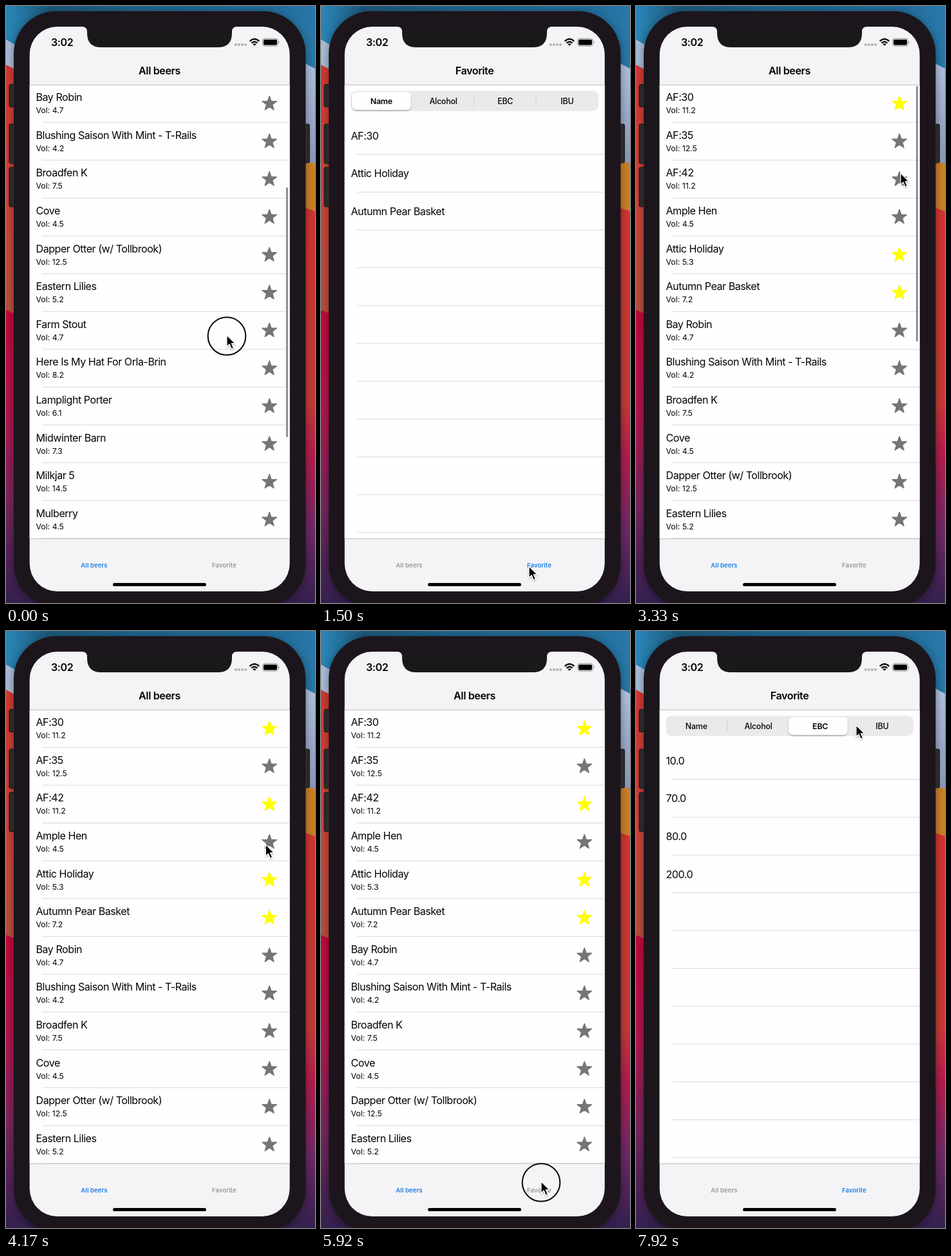
These frames come from a looping animation (480 px wide and 925 px high, 8 s). An HTML page:

```html
<!DOCTYPE html>
<html lang="en">
<head>
<meta charset="utf-8">
<title>Beer list</title>
<style>
html, body { margin: 0; width: 100%; height: 100%; overflow: hidden; background: #1a181a; }
svg { display: block; width: 480px; height: 925px; font-family: Inter, "Open Sans", sans-serif; }
text { fill: #050505; white-space: pre; }
.name { font-size: 16.1px; letter-spacing: -.48px; }
.vol { font-size: 12.3px; }
.title { font-size: 16.1px; font-weight: 600; letter-spacing: -.4px; text-anchor: middle; }
.clock { font-size: 16.1px; font-weight: 600; letter-spacing: -.4px; }
.seg { font-size: 12.4px; font-weight: 500; letter-spacing: -.2px; text-anchor: middle; }
.seg.on { font-weight: 600; }
.tab { font-size: 9.5px; font-weight: 600; letter-spacing: .1px; text-anchor: middle; fill: #98979a; }
.tab.on { fill: #187de8; }
.line { stroke: #d9d8db; stroke-width: 1; }
.star { fill: #757477; stroke: #757477; stroke-width: 1.4; stroke-linejoin: round; }
.star.on { fill: #ff0; stroke: #ff0; }
.btn { fill: #2b292b; stroke: #171517; }
</style>
</head>
<body>
<svg id="stage" viewBox="0 0 480 925">
  <defs>
    <linearGradient id="sky" x2="1" y2="0">
      <stop offset="0" stop-color="#2a86b8"/><stop offset=".14" stop-color="#1b5779"/>
      <stop offset=".5" stop-color="#1f658f"/><stop offset=".85" stop-color="#206a98"/><stop offset="1" stop-color="#2878a8"/>
    </linearGradient>
    <linearGradient id="red" x2="0" y2="1">
      <stop offset="0" stop-color="#d33a32"/><stop offset=".6" stop-color="#c9453a"/><stop offset="1" stop-color="#b5503f"/>
    </linearGradient>
    <linearGradient id="rose" x2="0" y2="1">
      <stop offset="0" stop-color="#c4083a"/><stop offset=".35" stop-color="#b3154f"/>
      <stop offset=".68" stop-color="#74265f"/><stop offset="1" stop-color="#33204f"/>
    </linearGradient>
    <linearGradient id="warm" x2="0" y2="1">
      <stop offset="0" stop-color="#d2342f"/><stop offset=".5" stop-color="#c63a36"/><stop offset=".63" stop-color="#b31c4c"/>
      <stop offset=".82" stop-color="#6e2868"/><stop offset="1" stop-color="#33204f"/>
    </linearGradient>
    <linearGradient id="pale" x2="0" y2="1">
      <stop offset="0" stop-color="#b4c6e2"/><stop offset="1" stop-color="#8796b8"/>
    </linearGradient>
    <clipPath id="screen"><rect x="36.700" y="32" width="404" height="875" rx="43"/></clipPath>
    <clipPath id="pane"><rect x="36" y="122" width="405" height="703"/></clipPath>
    <filter id="soft" x="-30%" y="-30%" width="160%" height="160%">
      <feDropShadow dx="0" dy="1.5" stdDeviation="1.3" flood-opacity=".3"/>
    </filter>
    <filter id="shade" x="-10%" y="-10%" width="120%" height="120%">
      <feDropShadow dx="0" dy="3" stdDeviation="7" flood-opacity=".4"/>
    </filter>
  </defs>

  <rect width="480" height="925" fill="url(#sky)"/>
  <path d="M0 52L40 75H240V130H0Z" fill="#a9bcd8"/>
  <path d="M0 91L40 112H240V480H0Z" fill="url(#red)"/>
  <path d="M0 471L40 488H240V925H0Z" fill="url(#rose)"/>
  <path d="M240 76H440L480 97V250H240Z" fill="url(#pale)"/>
  <path d="M240 236H440L480 244V330H240Z" fill="#c98128"/>
  <path d="M240 304H440L480 318V925H240Z" fill="url(#warm)"/>

  <rect x="12" y="8" width="453.500" height="923" rx="66" fill="#1a181a" filter="url(#shade)"/>
  <g class="btn">
    <rect x="5" y="121.500" width="8" height="35" rx="2"/>
    <rect x="5" y="183" width="8" height="61" rx="2"/>
    <rect x="5" y="250" width="8" height="61" rx="2"/>
    <rect x="464.500" y="183" width="7" height="60" rx="2"/>
  </g>

  <g clip-path="url(#screen)">
    <rect x="36" y="32" width="405" height="875" fill="#f4f3f6"/>
    <rect x="36" y="122" width="405" height="703" fill="#fefdff"/>
    <g clip-path="url(#pane)">
      <g id="list"></g>
      <rect id="bar" x="435" width="3" rx="1.500" fill="#8f8e92"/>
      <g id="fav"></g>
    </g>
    <path d="M36 122.300H441M36 825.300H441" stroke="#bdbcbf"/>
    <path d="M118 30V32Q126 32 126 40V42Q126 64 148 64H329Q351 64 351 42V40Q351 32 359 32V30Z" fill="#1a181a"/>
    <text class="clock" x="70" y="62">3:02</text>
    <g fill="#b4b3b6" id="dots"></g>
    <g fill="none" stroke="#000" stroke-width="2.200">
      <path d="M378.700 54.600Q386 47.800 393.300 54.600M381.500 57.500Q386 53.400 390.500 57.500"/>
    </g>
    <path d="M383.400 59.200Q386 57 388.600 59.200L386 61.800Z"/>
    <rect x="398.500" y="50.500" width="24" height="11.500" rx="3.500" fill="none" stroke="#8c8b8e"/>
    <rect x="400" y="52" width="21" height="8.500" rx="2"/>
    <path d="M424 54.300Q426 56.200 424 58.200Z" fill="#8c8b8e"/>
    <text class="title" id="title" x="238.500" y="106"></text>
    <text class="tab" id="tabAll" x="137" y="869.700">All beers</text>
    <text class="tab" id="tabFav" x="339" y="869.700">Favorite</text>
    <rect x="166" y="894" width="145" height="5" rx="2.500"/>
  </g>

  <circle id="ring" r="29.300" fill="none" stroke="#080808" stroke-width="2"/>
  <path id="cursor" filter="url(#soft)" stroke="#fff" stroke-width="1.200" stroke-linejoin="round"
    d="M0 0V17.800L4.100 14L7.200 21.200L10.400 19.800L7.300 12.800H12.900Z"/>
</svg>
<script>
const LOOP = 8000, STEP = 1000 / 12, ROW = 58.6, TOP = 122;
const $ = id => document.getElementById(id);

const beers = [
  ["AF:30", "11.2"], ["AF:35", "12.5"], ["AF:42", "11.2"], ["Ample Hen", "4.5"],
  ["Attic Holiday", "5.3"], ["Autumn Pear Basket", "7.2"], ["Bay Robin", "4.7"],
  ["Blushing Saison With Mint - T-Rails", "4.2"], ["Broadfen K", "7.5"], ["Cove", "4.5"],
  ["Dapper Otter (w/ Tollbrook)", "12.5"], ["Eastern Lilies", "5.2"], ["Farm Stout", "4.7"],
  ["Here Is My Hat For Orla-Brin", "8.2"], ["Lamplight Porter", "6.1"],
  ["Midwinter Barn", "7.3"], ["Milkjar 5", "14.5"], ["Mulberry", "4.5"]
];
const tabs = ["Name", "Alcohol", "EBC", "IBU"];
const sorted = [
  [0, 2, 4, 5].map(i => beers[i][0]),
  ["5.3", "7.2", "11.2", "11.2"],
  ["10.0", "70.0", "80.0", "200.0"]
];

// Tracks: [ms, values...]
const path = [
  [0, 343, 510], [1040, 343, 510], [1200, 340, 690], [1330, 323, 868], [1750, 323, 868],
  [2250, 137, 860], [2500, 137, 860], [3250, 411, 259], [3950, 411, 260], [4910, 352, 806],
  [5200, 342, 853], [6250, 342, 853], [6990, 249, 252], [7160, 200, 147], [7300, 200, 147],
  [7490, 285, 147], [7640, 285, 147], [7910, 342, 146]
];
const scroll = [[0, 6 * ROW], [1040, 6 * ROW], [1200, 172], [1410, 0]];
const glow = [[0, 1], [3480, 1], [3750, 0]];
const thumb = [[0, 0], [7240, 0], [7440, 1], [7570, 1], [7770, 2]];
const presses = [[0, 1200], [1330, 1410], [2330, 2410], [3560, 3670], [5830, 6080], [7160, 7240], [7490, 7570]];

function at(track, t) {
  const n = track.findIndex(k => k[0] > t);
  if (n < 0) return track[track.length - 1].slice(1);
  const a = track[n - 1], b = track[n];
  const p = (t - a[0]) / (b[0] - a[0]), e = p * p * (3 - 2 * p);
  return a.slice(1).map((v, i) => v + (b[i + 1] - v) * e);
}

function add(parent, tag, attrs, text) {
  const el = document.createElementNS("http://www.w3.org/2000/svg", tag);
  for (const k in attrs) el.setAttribute(k, attrs[k]);
  if (text) el.textContent = text;
  return parent.appendChild(el);
}
const line = (parent, y) => add(parent, "line", { class: "line", x1: 56, x2: 441, y1: y, y2: y });
const move = (el, x, y) => el.setAttribute("transform", `translate(${x} ${y})`);
const show = (el, on) => el.style.display = on ? "" : "none";

const starPoints = Array.from({ length: 10 }, (_, i) => {
  const r = i % 2 ? 4.8 : 11.8, a = i * Math.PI / 5;
  return `${(409.2 + r * Math.sin(a)).toFixed(2)},${(29.3 - r * Math.cos(a)).toFixed(2)}`;
}).join(" ");

const stars = beers.map(([name, vol], i) => {
  const row = add($("list"), "g");
  move(row, 0, TOP + i * ROW);
  add(row, "text", { class: "name", x: 46.5, y: 25.2 }, name);
  add(row, "text", { class: "vol", x: 46.5, y: 44.2 }, "Vol: " + vol);
  line(row, ROW - .3);
  return add(row, "polygon", { class: "star", points: starPoints });
});

const fav = $("fav");
add(fav, "rect", { x: 46.5, y: 131.5, width: 384.5, height: 31.3, rx: 8.5, fill: "#ebe9ec" });
const dividers = [142, 238, 334].map(x =>
  add(fav, "line", { x1: x, x2: x, y1: 138, y2: 157, stroke: "#d2d0d4" }));
const knob = add(fav, "rect", {
  x: 48, y: 133.3, width: 91.5, height: 27.8, rx: 7, fill: "#fefdff", filter: "url(#soft)"
});
const labels = tabs.map((s, i) => add(fav, "text", { class: "seg", x: 93.8 + 96.2 * i, y: 151.5 }, s));
for (let i = 0; i < 11; i++) line(fav, 229.8 + i * ROW);
const cells = sorted[0].map((_, i) => add(fav, "text", { class: "name", x: 46.5, y: 206.7 + i * ROW }));

for (let i = 0; i < 4; i++) add($("dots"), "rect", { x: 355 + i * 5.1, y: 58, width: 3.7, height: 3.7, rx: 1.2 });

function draw(t) {
  const isFav = t >= 1410 && t < 2410 || t >= 6080;
  const picked = t >= 3670;
  const [x, y] = at(path, t), [offset] = at(scroll, t), [pos] = at(thumb, t);

  show($("list"), !isFav);
  show($("bar"), !isFav);
  show(fav, isFav);
  $("title").textContent = isFav ? "Favorite" : "All beers";
  $("tabAll").classList.toggle("on", !isFav);
  $("tabFav").classList.toggle("on", isFav);

  move($("list"), 0, -offset);
  stars.forEach((s, i) => s.classList.toggle("on", [0, 4, 5].includes(i) || i === 2 && picked));
  const part = offset / (6 * ROW);
  $("bar").setAttribute("y", 124 + 157 * part);
  $("bar").setAttribute("height", 396 - 9 * part);
  $("bar").style.opacity = at(glow, t)[0];

  const sel = t >= 7570 ? 2 : t >= 7240 ? 1 : 0;
  move(knob, 94.6 * pos, 0);
  labels.forEach((l, i) => l.classList.toggle("on", i === sel));
  dividers.forEach((d, i) => show(d, i !== sel && i !== sel - 1));
  const items = picked ? sorted[sel] : sorted[0].filter((_, i) => i !== 1);
  cells.forEach((c, i) => c.textContent = items[i] || "");

  move($("cursor"), x, y);
  move($("ring"), x, y + 1.5);
  show($("ring"), presses.some(([a, b]) => t >= a && t < b));
}

const start = performance.now();
function tick() {
  const t = (performance.now() - start) % LOOP;
  draw(Math.floor(t / STEP + .05) * STEP);
  requestAnimationFrame(tick);
}
tick();
</script>
</body>
</html>
```
